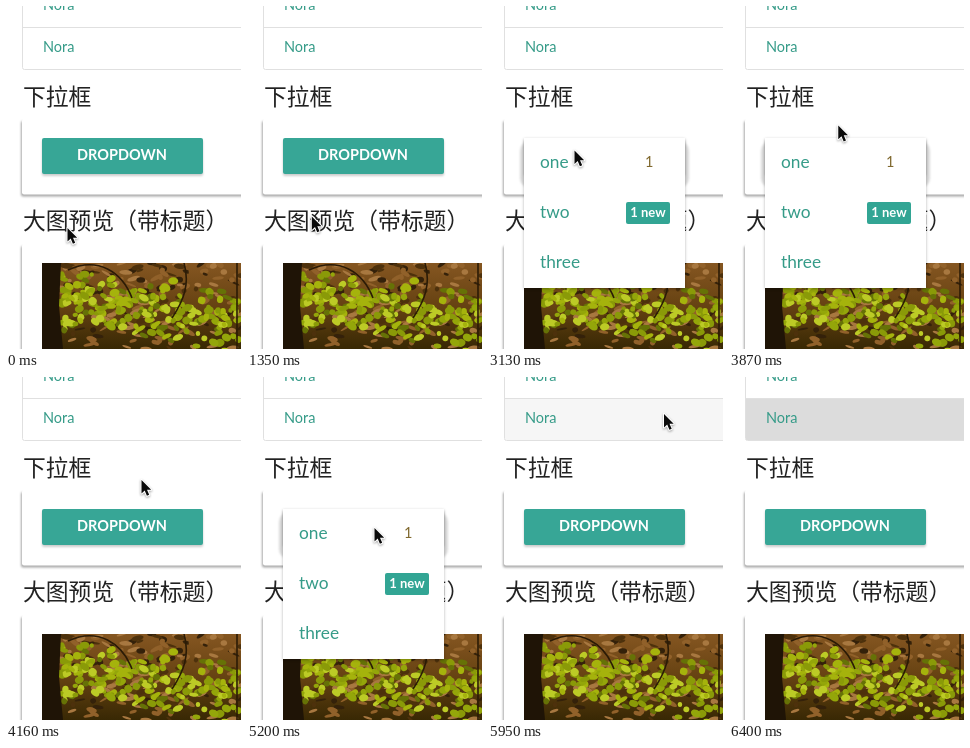
An HTML page that plays this animation: 235 px wide and 343 px high, repeating every 6.97 s.

```html
<!DOCTYPE html>
<html lang="zh">
<head>
<meta charset="utf-8">
<title>下拉框</title>
<style>
  html, body { margin: 0; width: 100%; height: 100%; overflow: hidden; background: #fff; }
  svg { display: block; width: 100vw; height: 100vh; }
  text { font-family: Lato, "Open Sans", sans-serif; }
  .head { font: 400 22.8px "Noto Sans CJK SC", "Noto Sans CJK", sans-serif; fill: #222; }
  .link { font-size: 17.3px; fill: #359b88; }
  .name { font-size: 14.5px; fill: #359b88; }
  .label { font-size: 14.5px; font-weight: 700; fill: #fff; text-anchor: middle; }
  .badge { font-size: 13px; font-weight: 700; fill: #fff; text-anchor: middle; }
  .card { fill: #fff; filter: drop-shadow(-.5px 2px 1px rgba(0,0,0,.34)); }
  .sheet { fill: #fff; filter: drop-shadow(0 1px 1.5px rgba(0,0,0,.3)); }
  .raised { filter: drop-shadow(0 2.5px 1px rgba(0,0,0,.2)); }
  .line { fill: none; stroke: #e0e0e0; }
  #cursor { filter: drop-shadow(0 1px 1px rgba(0,0,0,.35)); }
</style>
</head>
<body>
<svg viewBox="0 0 235 343" preserveAspectRatio="none">
  <defs>
    <linearGradient id="ground" x1="0" y1="0" x2="0" y2="1">
      <stop offset="0" stop-color="#855621"/>
      <stop offset=".5" stop-color="#664212"/>
      <stop offset="1" stop-color="#382804"/>
    </linearGradient>
    <clipPath id="frame"><rect x="36" y="257" width="199" height="86"/></clipPath>
    <clipPath id="fold"><rect id="foldBox" x="36" y="132" width="161" height="150"/></clipPath>
  </defs>
  <rect width="235" height="343" fill="#fff"/>

  <rect id="row" x="17" y="22" width="218" height="41" fill="#dcdcdc"/>
  <path class="line" d="M16.5 0V61.5q0 2 2 2H235M17 21.5H235"/>
  <text class="name" x="37" y="4">Nora</text>
  <text class="name" x="37" y="46">Nora</text>

  <text class="head" x="17" y="99">下拉框</text>
  <rect class="card" x="16" y="113" width="240" height="75.5" rx="2"/>
  <text class="head" x="17" y="223">大图预览（带标题）</text>
  <rect class="card" x="16" y="238" width="240" height="130" rx="2"/>

  <g clip-path="url(#frame)">
    <rect x="36" y="257" width="199" height="86" fill="url(#ground)"/>
    <g id="leaves"></g>
    <path d="M36 257H55L53 300 57 343H36z" fill="#1f1406"/>
    <path d="M178 257C184 278 178 294 166 312M62 264C92 250 116 266 126 292M231 257V343"
      fill="none" stroke="#2b1b06" stroke-width="1.6"/>
  </g>

  <rect id="glow" x="32" y="135" width="169" height="47" rx="10" fill="#d9d9d9" style="filter:blur(.8px)"/>
  <rect class="raised" x="36" y="132" width="161" height="36" rx="2" fill="#37a696"/>
  <text class="label" x="116" y="154.3">DROPDOWN</text>

  <g id="menu">
    <rect id="sheet" class="sheet" x="36" y="132" width="161" height="150"/>
    <g clip-path="url(#fold)">
      <text class="link" x="52" y="162">one</text>
      <text x="157" y="161" font-size="14.5" fill="#80692f">1</text>
      <text class="link" x="52" y="212">two</text>
      <rect x="138" y="196" width="44" height="22" rx="2" fill="#32a594"/>
      <text class="badge" x="160" y="211">1 new</text>
      <text class="link" x="52" y="262">three</text>
    </g>
  </g>

  <path id="cursor" d="M0 0V13.6L3.2 10.6 5.4 15.8 7.7 14.8 5.5 9.7H9.7z"
    fill="#0a0a0a" stroke="#fff" stroke-width="2" paint-order="stroke" stroke-linejoin="round"/>
</svg>
<script>
const LOOP = 6970, TICKS = 47;
const $ = id => document.getElementById(id);
const set = (id, attrs) => {
  for (const key in attrs) $(id).setAttribute(key, attrs[key]);
};
const clamp = v => Math.min(1, Math.max(0, v));

// The screen refreshes in ticks; all times below count them.
const home = { x: 61.5, y: 222 };
const glides = [
  { from: 8, to: 14, x: 110, y: 153 },
  { from: 16, to: 18, x: 86.5, y: 144.5 },
  { from: 23, to: 28, x: 135.5, y: 103 },
  { from: 30, to: 32, x: 127.5, y: 151 },
  { from: 35, to: 38, x: 175.5, y: 65 },
  { from: 38, to: 40, x: 176, y: 37 },
  { from: 40, to: 41, x: 168, y: 275 }
];
const visits = [{ open: 20, close: 27 }, { open: 34, close: 39 }];
const rowHover = 39, pointerGone = 43;

// Each glide lifts first and drifts sideways later
function pointerAt(n) {
  let { x, y } = home;
  for (const g of glides) {
    const p = clamp((n - g.from) / (g.to - g.from));
    x += (g.x - x) * p ** 1.5;
    y += (g.y - y) * p;
  }
  return `translate(${x} ${y})`;
}

// Unfolds while fading in, then fades out at full height
function menuAt(n) {
  const v = visits.find(v => n >= v.open && n <= v.close);
  if (!v) return { share: 0, alpha: 0 };
  const share = clamp((n - v.open + 1) / 2);
  return { share, alpha: share * clamp((v.close + 1 - n) / 2) };
}

function growLeaves() {
  let seed = 11;
  const rnd = () => (seed = seed * 16807 % 2147483647) / 2147483647;
  const pick = list => list[Math.floor(rnd() * list.length)];
  const greens = ["#a5b30c", "#8a9a08", "#bccb26", "#667206", "#94a60a"];
  const soil = ["#a87840", "#4d310c", "#34210a", "#91612a"];
  const blob = (x, y, rx, ry, fill) =>
    `<ellipse rx="${rx}" ry="${ry}" fill="${fill}" transform="translate(${x} ${y}) rotate(${rnd() * 80 - 40})"/>`;
  let out = "";
  for (let i = 0; i < 170; i++)
    out += blob(54 + rnd() * 181, 257 + 86 * rnd() ** 1.3, 2 + rnd() * 5, 1 + rnd() * 2, pick(soil));
  for (let i = 0; i < 230; i++) {
    const across = rnd() ** 1.3;
    const down = (rnd() + rnd()) / 2;
    out += blob(56 + across * 178, 260 + across * 22 + down * 66, 2 + rnd() * 3.5, 2 + rnd() * 2, pick(greens));
  }
  $("leaves").innerHTML = out;
}

function draw(t) {
  const n = Math.floor(t / LOOP * TICKS);
  const { share, alpha } = menuAt(n);
  const height = 150 * share;
  set("cursor", { transform: pointerAt(n), opacity: n < pointerGone ? 1 : 0 });
  set("menu", { opacity: alpha });
  set("sheet", { height });
  set("foldBox", { height });
  set("glow", { opacity: alpha });
  set("row", { opacity: clamp((n - rowHover) / 2) ** 2 });
}

growLeaves();
const start = performance.now();
function tick() {
  draw((performance.now() - start) % LOOP);
  requestAnimationFrame(tick);
}
tick();
</script>
</body>
</html>
```
